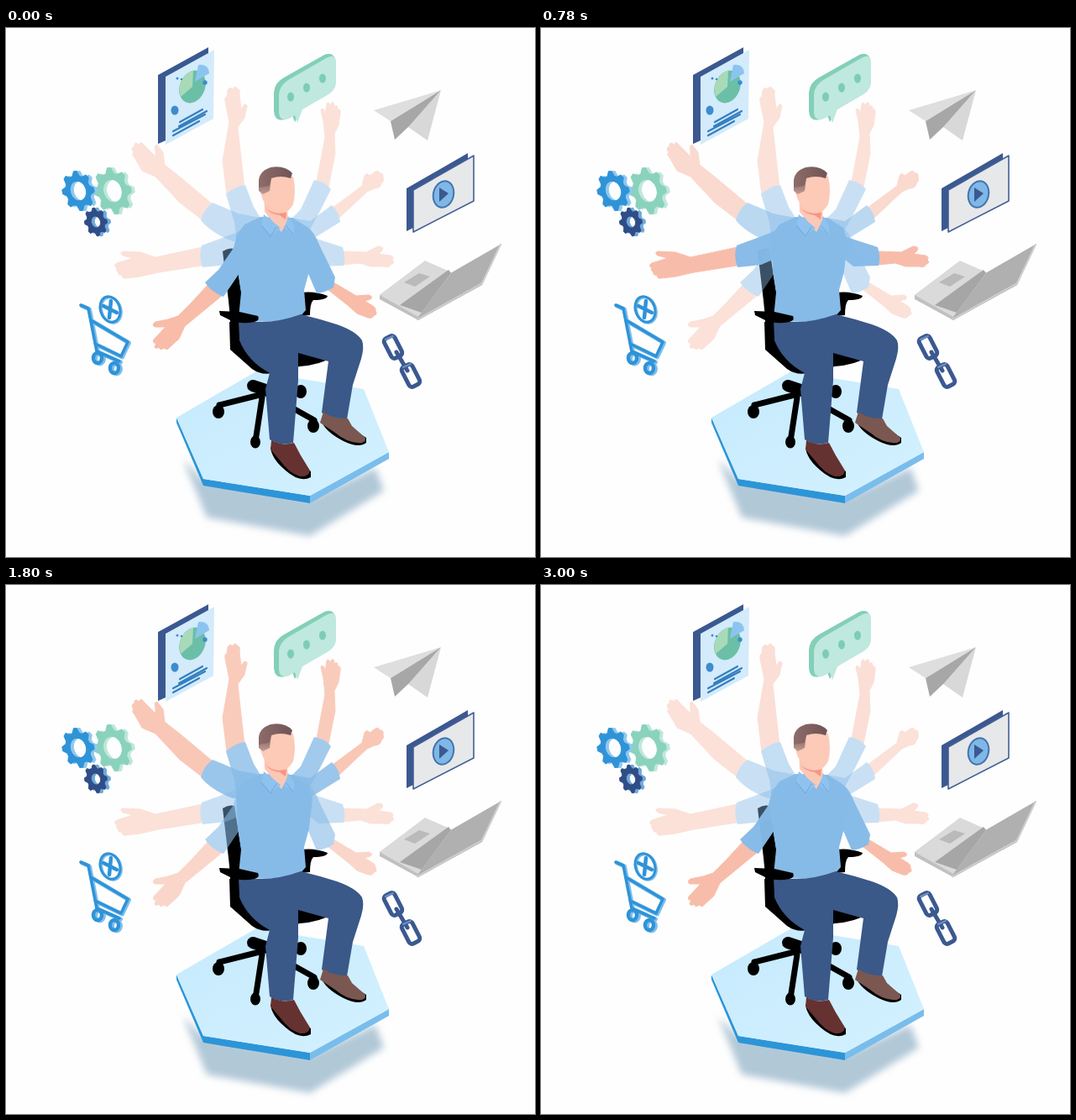
Recreate the animation shown at these times as an HTML page. Size 630 by 630 pixels, loop 3.06 s.

```html
<!DOCTYPE html>
<html lang="en">
<head>
<meta charset="utf-8">
<title>Many arms</title>
<style>
  html, body { margin: 0; width: 100%; height: 100%; overflow: hidden; background: #fefefe; }
  svg { display: block; width: 100%; height: 100%; stroke-linejoin: round; }
  .skin { fill: #f8bca8; stroke: #f8bca8; stroke-width: 1; }
  .shirt { fill: #86bbe8; }
  .pants { fill: #3a5888; }
  .line { fill: none; stroke-linecap: round; }
</style>
</head>
<body>
<svg viewBox="0 0 630 630">
  <defs>
    <filter id="blur" x="-10%" y="-20%" width="120%" height="140%"><feGaussianBlur stdDeviation="4"/></filter>
    <linearGradient id="hair"><stop offset="0" stop-color="#8d6c69"/><stop offset="1" stop-color="#705455"/></linearGradient>
    <linearGradient id="temple" x2="0" y2="1"><stop offset="0" stop-color="#785b5b"/><stop offset="1" stop-color="#c29a90"/></linearGradient>
    <linearGradient id="floor" x2="1" y2="1"><stop offset="0" stop-color="#c5eafd"/><stop offset="1" stop-color="#d4f1ff"/></linearGradient>
  </defs>

  <!-- platform -->
  <path d="M211 514L239 583L362 605L450 551L440 524L362 560L235 538Z" fill="#b1c8d7" filter="url(#blur)"/>
  <path d="M203 464L235 537L362 557V566L235 545L203 470Z" fill="#2c95d8"/>
  <path d="M362 557L456 505V513L362 566Z" fill="#79bdec"/>
  <path d="M203 464L298 409L426 430L456 505L362 557L235 537Z" fill="url(#floor)"/>

  <!-- document -->
  <path d="M181 56L241 23V31L190 60V134L181 138Z" fill="#3b5990"/>
  <path d="M190 58L248 26L247 108L190 139Z" fill="#d3ebfb"/>
  <ellipse cx="222" cy="70" rx="15" ry="20" transform="rotate(22 222 70)" fill="#6bbfa7"/>
  <path d="M222 70L208 82Q202 60 223 50Z" fill="#a9dab8"/>
  <path d="M225 64L229 44Q241 42 242 54Z" fill="#8cc4f0"/>
  <g fill="#3d8ccb"><ellipse cx="201" cy="98" rx="4.5" ry="5.5"/><circle cx="237" cy="65" r="2.7"/><circle cx="204" cy="60" r="1.5"/><circle cx="209" cy="61" r="1.3"/></g>
  <path class="line" d="M207 112L234 97M206 117L239 99M199 123L237 103M199 128L230 111" stroke="#367fc1" stroke-width="2.2"/>

  <!-- chat bubble -->
  <path d="M331 59L379 32Q388 28 392 36V67Q391 74 383 79L352 97L344 112L341 104L332 109Q320 112 319 99V77Q320 65 331 59Z" fill="#83cfb7"/>
  <path d="M336 62L381 36Q393 29 393 41V66Q392 74 384 79L353 97L347 113L344 104L337 108Q326 112 325 101V79Q326 68 336 62Z" fill="#bfe8de"/>
  <g fill="#7dcdb3"><ellipse cx="339" cy="82" rx="4" ry="5.5"/><ellipse cx="358" cy="71" rx="4" ry="5.5"/><ellipse cx="377" cy="60" rx="4" ry="5.5"/></g>

  <!-- paper plane -->
  <path d="M438 98L518 74L458 111Z" fill="#dedede"/>
  <path d="M518 74L502 134L479 118Z" fill="#d8d8d8"/>
  <path d="M518 74L458 111L463 133L480 117Z" fill="#a7a7a7"/>

  <!-- video -->
  <path d="M477 191L550 149V158L485 195V238L477 242Z" fill="#3b5990"/>
  <path d="M485 193L557 152V206L485 243Z" fill="#e7e8ea" stroke="#435f94" stroke-width="1.6"/>
  <ellipse cx="521" cy="198" rx="12" ry="16" transform="rotate(14 521 198)" fill="#7fb7e6" stroke="#4275ae" stroke-width="2"/>
  <path d="M516 190V207L527 197Z" fill="#3b5990"/>

  <!-- laptop -->
  <path d="M445 318L499 278L546 298L491 344V348L445 323Z" fill="#c0c0c0"/>
  <path d="M445 318L499 277L546 298L491 344Z" fill="#dadada"/>
  <path d="M469 330L527 288L530 292L495 339Z" fill="#a6a6a6"/>
  <path d="M474 303L492 292L505 296L487 308Z" fill="#bababa"/>
  <path d="M491 344L531 291L590 257L567 306L491 348Z" fill="#b0b0b0"/>
  <path d="M490 347L567 304L589 258" class="line" stroke="#cfcfcf" stroke-width="2"/>

  <!-- chain -->
  <g class="line" stroke="#3b5990" stroke-width="5">
    <rect x="-7" y="-13" width="14" height="26" rx="4" transform="translate(461 380) rotate(-27)"/>
    <rect x="-7" y="-13" width="14" height="26" rx="4" transform="translate(482 414) rotate(-27)"/>
    <path d="M465 386L478 408"/>
    <path d="M452 371L461 367M473 404L482 400" stroke="#6f91bf" stroke-width="2"/>
  </g>

  <!-- cart -->
  <g class="line" stroke="#7fbfec" stroke-width="5" transform="translate(1.5 1)">
    <path d="M89 330L98 334L108 385L135 397M101 348L145 374L137 391L106 376"/>
    <ellipse cx="124" cy="335" rx="11.5" ry="15.5" transform="rotate(-18 124 335)" stroke-width="3"/>
    <ellipse cx="110" cy="393" rx="5" ry="6"/>
    <ellipse cx="130" cy="405" rx="5" ry="6"/>
  </g>
  <g class="line" stroke="#2f93d8" stroke-width="3.6">
    <path d="M89 330L98 334L108 385L135 397M101 348L145 374L137 391L106 376"/>
    <ellipse cx="124" cy="335" rx="11.5" ry="15.5" transform="rotate(-18 124 335)" stroke-width="3"/>
    <path d="M116 331L132 339M125 325L123 345" stroke-width="4.5"/>
    <ellipse cx="109" cy="393" rx="5" ry="6" stroke-width="4.5"/>
    <ellipse cx="129" cy="405" rx="5" ry="6" stroke-width="4.5"/>
  </g>

  <g id="gears"></g>

  <!-- chair -->
  <path d="M258 266Q265 261 272 263L285 345L300 405L267 382V345L265 325Z"/>
  <path d="M266 350L285 356L388 392Q375 401 350 403L318 411Q304 414 293 406L267 383Z"/>
  <path d="M352 315Q368 313 383 319Q382 324 366 324Q362 328 362 342L350 343Q351 329 354 321Z"/>
  <g class="line" stroke="#000" stroke-width="8">
    <path d="M294 426L312 432" stroke-width="14"/>
    <path d="M302 437L254 449M305 440L298 486M308 434L367 467M310 428L350 433" stroke-width="7"/>
  </g>
  <ellipse cx="253" cy="457" rx="7" ry="8"/><ellipse cx="297" cy="493" rx="6" ry="7.5"/>
  <ellipse cx="366" cy="474" rx="7" ry="8"/><ellipse cx="351" cy="433" rx="7" ry="8"/>

  <!-- arm pairs, lowest first -->
  <g class="arms">
    <path class="skin" d="M242 304L220 328L205 343L193 347L178 350Q173 353 177 356L190 356L176 371Q174 376 179 375L177 380Q179 383 182 380Q184 385 188 381L192 383L206 370L213 355L258 318Z"/>
    <path class="skin" d="M390 303L417 319L432 318Q438 320 434 323L427 325L437 331Q441 334 440 337Q443 342 438 342Q437 346 431 345L418 340L408 331L384 312Z"/>
    <path class="shirt" d="M303 226L284 236Q275 242 271 262L253 288L237 303Q245 315 259 320L278 292L300 260Z"/>
    <path class="shirt" d="M341 226L360 238Q367 243 373 258L392 297L390 309Q380 315 370 316L358 288Z"/>
  </g>
  <g class="arms">
    <path class="skin" d="M234 261L178 273L160 267L140 266Q134 267 139 271L151 274L132 280Q127 283 132 286Q130 289 134 291Q133 295 138 294Q138 299 143 298L160 296L182 291L233 283Z"/>
    <path class="skin" d="M401 266L429 267L443 260Q451 260 448 265L444 269L458 271Q463 273 460 276Q464 280 459 281Q457 286 450 284L434 284L422 280L401 282Z"/>
    <path class="shirt" d="M300 230L273 244L233 259Q229 273 234 285L262 282L290 270Z"/>
    <path class="shirt" d="M345 230L364 249L401 261Q405 273 402 283L372 284L355 270Z"/>
  </g>
  <g class="arms">
    <path class="skin" d="M245 209L208 178L189 163L187 148L180 139Q176 139 178 146L178 153L165 140Q160 133 159 139Q152 134 153 141Q148 142 152 148Q149 151 153 154L162 170L178 177L207 208L233 228Z"/>
    <path class="skin" d="M389 214L424 188L427 176Q430 171 433 176L440 171Q444 169 445 173Q450 172 449 178Q451 182 447 185Q446 191 439 191L430 195L397 226Z"/>
    <path class="shirt" d="M303 226L277 221L246 208Q235 216 232 229Q244 244 270 254L295 252Z"/>
    <path class="shirt" d="M341 226L362 230L388 211Q397 219 398 231L364 252L350 255Z"/>
  </g>
  <g class="arms">
    <path class="skin" d="M263 199L258 158L266 112L261 88Q260 82 263 82L264 74Q267 69 270 73Q273 67 276 73Q279 72 278 80L280 96L284 91Q289 91 286 97L284 107L276 118L280 155L284 190Z"/>
    <path class="skin" d="M370 183L380 130L378 111L375 98Q376 94 379 98L380 104L382 90Q384 87 386 92L388 89Q391 87 391 94Q395 90 395 97Q399 96 398 102L396 116L391 126L392 150L384 189Z"/>
    <path class="shirt" d="M303 226L295 213L285 187Q273 188 262 198L272 232L276 260L300 255Z"/>
    <path class="shirt" d="M341 226L351 216L367 181Q380 183 387 192L374 218L361 242L345 255Z"/>
  </g>

  <!-- body -->
  <path class="shirt" d="M303 225L284 234L274 248L276 290L280 315L277 345Q310 355 350 344L357 336L355 312L361 290L365 255L360 238L341 226Z"/>
  <path d="M307 190L308 219L328 243L336 228L334 205Z" fill="#fcc8b6"/>
  <path d="M309 214Q320 224 334 219L333 228L326 223Q315 222 309 214Z" fill="#f99484"/>
  <path d="M314 180Q326 173 342 177Q346 195 342 210Q335 222 327 220Q315 217 306 205L303 196Z" fill="#fdcab8"/>
  <path d="M301 181L316 178L314 194L306 198L301 194Z" fill="url(#temple)"/>
  <path d="M301 185Q300 171 315 166Q332 163 341 173L339 179Q327 175 316 179L313 188L301 190Z" fill="url(#hair)"/>
  <path d="M307 222L304 235L315 248L327 238Z" fill="#8fc2ee"/>
  <path d="M336 224L343 235V246L332 239Z" fill="#8fc2ee"/>
  <path class="line" d="M304 235L315 248L322 237M334 236L342 246" stroke="#6ca6dc"/>

  <!-- legs -->
  <path class="pants" d="M275 346Q310 356 351 341Q372 346 394 353Q417 361 424 372Q427 380 423 394L413 425L406 466Q389 468 376 458L384 397L348 387L348 420L342 494Q326 498 314 490L309 430L314 411Q288 397 278 372Z"/>
  <path d="M375 467Q380 481 402 492Q420 501 429 494V488L410 476Z"/>
  <path d="M378 457Q390 466 407 465L412 474L428 488Q429 495 419 494Q405 493 392 482L374 470Z" fill="#7a5750"/>
  <path d="M315 499Q316 513 333 527Q350 542 363 535V528Z"/>
  <path d="M316 491Q329 498 343 494L351 509L362 527Q361 535 350 534Q337 530 327 516L315 502Z" fill="#653231"/>
  <path d="M254 337L278 338L300 343Q303 348 296 350Q281 353 269 349L255 342Z"/>
  <path d="M270 348L277 348L278 370L268 382Z"/>
</svg>
<script>
const LOOP = 3060, STEP = 60;
const arms = document.querySelectorAll('.arms');

// [time, opacity] for each pair of arms
const fades = [
  [[0, 1], [540, .5], [660, .43], [1140, .43], [1800, .6], [2220, .66], [2640, .83], [LOOP, 1]],
  [[0, .43], [480, .82], [720, 1], [1140, .8], [1680, .43], [LOOP, .43]],
  [[0, .43], [600, .43], [1140, .8], [1440, 1], [1800, .83], [2220, .48], [2700, .43], [LOOP, .43]],
  [[0, .43], [1140, .43], [1800, .77], [2160, 1], [2280, 1], [2640, .75], [LOOP, .43]]
];

function valueAt(keys, t) {
  const i = keys.findIndex(k => k[0] > t);
  const [t0, a] = keys[i - 1], [t1, b] = keys[i];
  return a + (b - a) * (t - t0) / (t1 - t0);
}

function gear(x, y, r, hole, color, side) {
  const points = Array.from({ length: 32 }, (_, i) => {
    const a = (i + .5) * Math.PI / 16, d = i % 4 < 2 ? r : r * .78;
    return (d * Math.cos(a)).toFixed(1) + ' ' + (d * Math.sin(a)).toFixed(1);
  });
  const d = `M${points.join('L')}ZM${hole} 0A${hole} ${hole} 0 1 0 ${-hole} 0A${hole} ${hole} 0 1 0 ${hole} 0Z`;
  const layer = (dx, fill) =>
    `<path d="${d}" fill="${fill}" stroke="${fill}" fill-rule="evenodd" transform="translate(${x + dx} ${y}) rotate(-18) scale(.78 1)"/>`;
  return layer(4, side) + layer(0, color);
}

document.getElementById('gears').innerHTML =
  gear(127, 194, 28, 14, '#8ad2bc', '#bfe7dc') +
  gear(86, 194, 24, 12, '#2f93d8', '#8fc8ef') +
  gear(107, 231, 17, 7, '#2f4d86', '#6fa8da');

function draw(now) {
  const t = Math.floor(now % LOOP / STEP) * STEP;
  arms.forEach((g, i) => g.setAttribute('opacity', valueAt(fades[i], t)));
  requestAnimationFrame(draw);
}
draw(performance.now());
</script>
</body>
</html>
```
